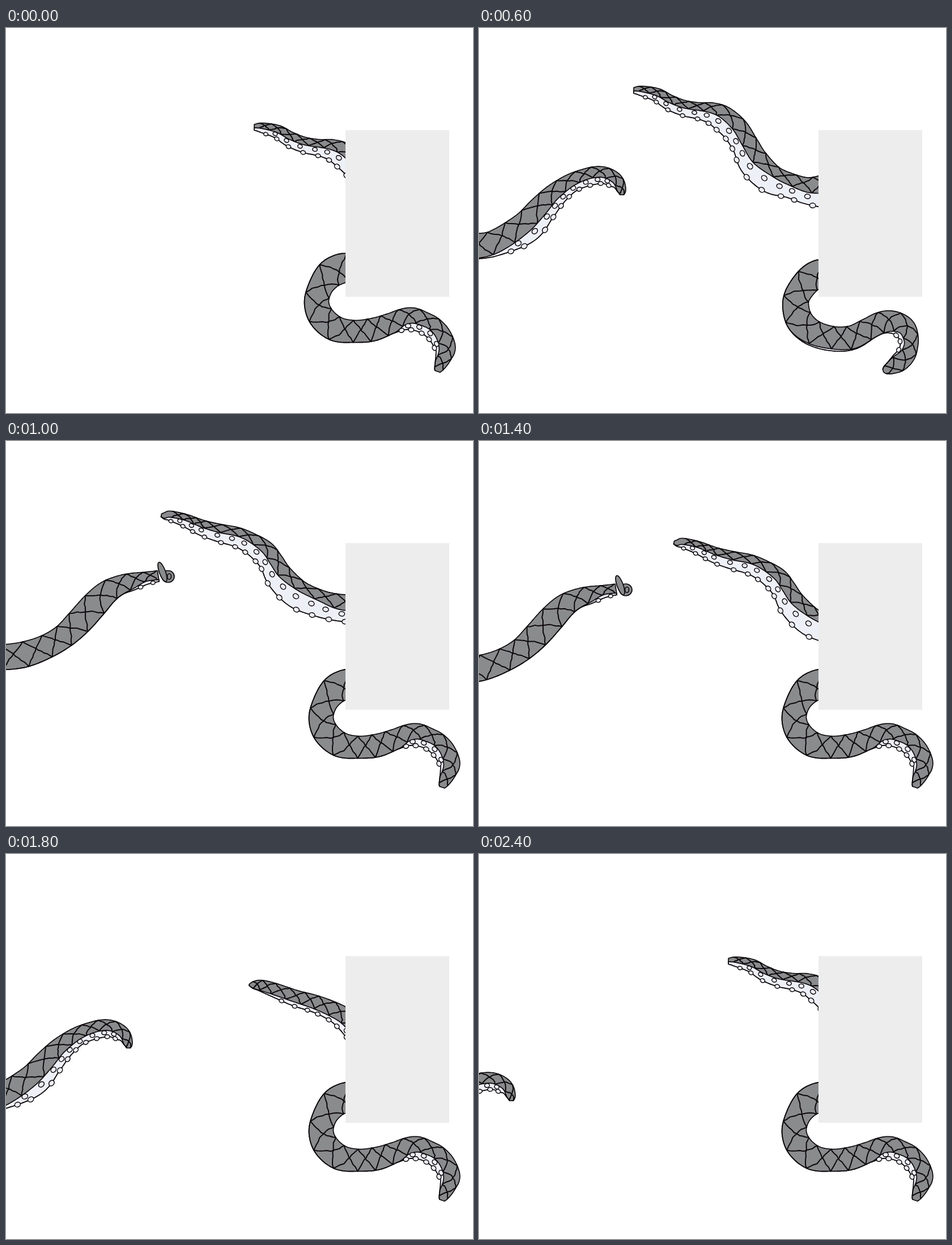
Write an HTML page that moves like this. It is 824x679 px and loops after 2600 ms.

```html
<!DOCTYPE html>
<html lang="en">
<head>
<meta charset="utf-8">
<title>Tentacles</title>
<style>
html, body { margin: 0; width: 100%; height: 100%; overflow: hidden; background: #fff; }
svg { display: block; width: 100%; height: 100%; }
path, ellipse { stroke: #0c070a; stroke-width: 1.7; stroke-linejoin: round; stroke-linecap: round; }
.skin { fill: #898b8d; }
.belly { fill: #eef0f8; }
.line { fill: none; stroke-width: 2; }
.sucker { fill: #eceef5; stroke-width: 1.5; }
</style>
</head>
<body>
<svg id="stage" viewBox="0 0 824 679" preserveAspectRatio="none">
  <g id="arms"></g>
  <rect x="599" y="180" width="183" height="294" fill="#ededed"/>
</svg>
<script>
// spine: key points [x, y, width, belly share of the width];
// pitch and phase set the spacing and start of the crossed skin lines.
const poses = {
  leftOpen: { pitch: 1, phase: -9, spine: [
    [-10, 385, 45, 0], [26, 380, 45, .1], [81, 353, 55, .33], [110, 321, 49, .3], [133, 296, 41, .31],
    [160, 275, 33, .3], [184, 265, 31, .36], [205, 260, 31, .38], [222, 260, 29, .35], [238, 267, 27, .3],
    [247, 275, 21, .15], [252, 288, 14, 0], [252, 296, 4, 0]] },
  leftCurl: { pitch: 1.05, phase: 3, curl: [286, 239], spine: [
    [-10, 382, 44, 0], [30, 377, 45, 0], [68, 364, 42, 0], [101, 345, 42, 0], [128, 320, 46, 0], [155, 290, 46, 0],
    [177, 268, 41, 0], [199, 255, 34, 0], [223, 248, 30, .1], [247, 242, 22, .25], [270, 238, 19, .15]] },
  highFlat: { pitch: 1, phase: 10, spine: [
    [273, 110, 10, .4], [287, 111, 17, .42], [314, 118, 23, .43], [336, 131, 26, .47], [361, 141, 27, .5],
    [388, 146, 29, .52], [410, 150, 37, .5], [429, 159, 44, .48], [452, 179, 46, .43], [470, 207, 46, .4],
    [486, 238, 53, .48], [515, 266, 50, .6], [549, 278, 43, .5], [580, 287, 47, .44], [612, 288, 60, .44]] },
  highRound: { pitch: 1, phase: 22, spine: [
    [274, 131, 5, 0], [280, 132, 12, .15], [290, 132, 17, .35], [316, 140, 22, .5], [346, 153, 27, .52],
    [376, 162, 31, .52], [406, 169, 34, .55], [429, 179, 36, .53], [454, 196, 42, .47], [469, 215, 42, .43],
    [484, 241, 48, .5], [514, 270, 50, .62], [552, 286, 47, .58], [582, 293, 47, .45], [612, 296, 48, .4]] },
  highTurned: { pitch: 1.1, phase: 8, spine: [
    [379, 216, 2, 0], [386, 216, 12, 0], [399, 217, 19, .05], [421, 224, 24, .15], [460, 239, 28, .25],
    [495, 249, 30, .2], [524, 261, 33, .2], [545, 274, 37, .25], [565, 296, 38, .3], [584, 318, 42, .3], [615, 355, 50, .35]] },
  lowWide: { pitch: .92, phase: 0, spine: [
    [612, 427, 50, 0], [597, 430, 52, 0], [579, 440, 50, 0], [563, 462, 43, 0], [556, 489, 43, 0], [565, 515, 45, 0],
    [589, 535, 44, 0], [621, 540, 39, 0], [655, 537, 40, 0], [687, 526, 36, 0], [708, 519, 37, .2], [726, 518, 39, .3],
    [744, 524, 37, .33], [760, 533, 38, .35], [774, 548, 38, .3], [783, 569, 36, .2], [780, 585, 28, .13],
    [775, 598, 21, 0], [770, 609, 12, 0], [769, 613, 3, 0]] },
  lowCurved: { pitch: .92, phase: 0, spine: [
    [612, 423, 53, 0], [597, 425, 51, 0], [580, 437, 49, 0], [562, 462, 46, 0], [560, 485, 46, 0], [567, 509, 47, .04],
    [585, 524, 46, .11], [616, 532, 40, .16], [646, 529, 38, .13], [676, 517, 35, .02], [700, 509, 35, 0],
    [716, 507, 38, .06], [734, 511, 38, .15], [748, 521, 38, .16], [757, 534, 36, .18], [761, 548, 34, .16],
    [757, 564, 30, .1], [747, 573, 23, .03], [738, 578, 16, 0], [729, 581, 7, 0]] },
  lowHooked: { pitch: .92, phase: 0, spine: [
    [612, 433, 50, 0], [597, 435, 50, 0], [580, 446, 47, 0], [562, 471, 45, 0], [559, 493, 46, 0], [567, 518, 47, 0],
    [590, 538, 45, .05], [625, 548, 43, .08], [658, 546, 42, .03], [688, 530, 38, 0], [706, 521, 38, 0],
    [723, 518, 39, .05], [740, 522, 39, .13], [752, 531, 38, .2], [758, 545, 34, .22], [759, 559, 31, .22],
    [754, 576, 32, .15], [741, 590, 32, .06], [727, 599, 23, 0], [717, 603, 14, 0], [713, 604, 5, 0]] }
};

// Keys [step, pose, dx, dy]: linear between keys of one pose, held otherwise.
const tracks = [
  [[1, 'leftOpen', -220, 84], [3, 'leftOpen', 0, 0], [4, 'leftCurl', 0, -5], [5, 'leftCurl', 0, 0],
   [6, 'leftCurl', -5, 1], [8, 'leftCurl', -49, 46], [9, 'leftOpen', -36, 48], [10, 'leftOpen', -62, 50],
   [11, 'leftOpen', -138, 106], [12, 'leftOpen', -195, 141]],
  [[0, 'highFlat', 165, 65], [2, 'highFlat', 76, 26], [3, 'highFlat', 0, 0], [4, 'highRound', 0, -9],
   [5, 'highRound', 0, 0], [7, 'highRound', 70, 48], [8, 'highTurned', 0, 0], [9, 'highTurned', 50, 15],
   [10, 'highFlat', 167, 79]],
  [[0, 'lowWide', -8, -5], [1, 'lowWide', 0, 0], [2, 'lowCurved', 0, 0], [3, 'lowHooked', 0, 0],
   [4, 'lowCurved', 0, 13], [5, 'lowWide', 0, 0], [8, 'lowCurved', 0, 13], [9, 'lowWide', 0, 0],
   [10, 'lowCurved', 0, 13], [11, 'lowWide', 0, 0]]
];
const STEP = 200, LOOP = 2600;

const mix = (a, b, t) => a + (b - a) * t;
const polyline = pts => 'M' + pts.map(p => p.map(v => v.toFixed(1))).join('L');

function catmull(a, b, c, d, t) {
  return b + t * (c - a + t * (2 * a - 5 * b + 4 * c - d + t * (3 * (b - c) + d - a))) / 2;
}

// Samples the spine evenly: an array of points 2 units apart.
function sampleSpine(keys) {
  const fine = [];
  for (let i = 0; i < keys.length - 1; i++) {
    const quad = [keys[i - 1] || keys[i], keys[i], keys[i + 1], keys[i + 2] || keys[i + 1]];
    for (let t = 0; t < 1; t += 1 / 32) {
      fine.push(keys[i].map((_, k) => catmull(...quad.map(q => q[k]), t)));
    }
  }
  fine.push(keys[keys.length - 1]);
  const even = [fine[0]];
  for (const p of fine) {
    const last = even[even.length - 1];
    if (Math.hypot(p[0] - last[0], p[1] - last[1]) >= 2) even.push(p);
  }
  return even;
}

// Describes a body: at(s) gives the section, edge(s, k) a point from back (0) to rim (1).
function makeBody(keys) {
  const pts = sampleSpine(keys), end = pts.length - 1;
  const length = pts.slice(1).reduce((sum, p, i) => sum + Math.hypot(p[0] - pts[i][0], p[1] - pts[i][1]), 0);
  const at = s => {
    const i = Math.round(Math.min(1, Math.max(0, s / length)) * end);
    const [x, y, w, share] = pts[i];
    const a = pts[Math.max(0, i - 2)], b = pts[Math.min(end, i + 2)];
    return { x, y, w, belly: Math.max(0, share), angle: Math.atan2(b[1] - a[1], b[0] - a[0]) };
  };
  const edge = (s, k) => {
    const p = at(s), off = p.w * (.5 - k);
    return [p.x + Math.sin(p.angle) * off, p.y - Math.cos(p.angle) * off];
  };
  const seam = s => 1 - at(s).belly;
  const side = k => {
    const out = [];
    for (let s = 0; s <= length; s += 2) out.push(edge(s, k(s)));
    return out;
  };
  return { at, edge, seam, side, length };
}

function add(parent, tag, attrs) {
  const el = document.createElementNS('http://www.w3.org/2000/svg', tag);
  for (const k in attrs) el.setAttribute(k, attrs[k]);
  return parent.appendChild(el);
}

function addEllipse(g, cls, [x, y], rx, ry, turn = 0) {
  add(g, 'ellipse', { class: cls, rx, ry, transform: `translate(${x} ${y}) rotate(${turn})` });
}

// A slightly arched line across the back, from one section to another.
function crossLine(body, from, to) {
  const pts = [];
  for (let i = 0; i <= 10; i++) {
    const t = i / 10, s = mix(from, to, t * (1.35 - .35 * t));
    pts.push(body.edge(s, t * body.seam(s)));
  }
  return polyline(pts);
}

function addSkinLines(g, body, pitch, phase) {
  let d = '';
  for (let s = phase, next; s < body.length - 12; s = next) {
    next = s + pitch * (8 + .65 * body.at(s).w);
    d += crossLine(body, s, next) + crossLine(body, next, s);
  }
  add(g, 'path', { class: 'line', d });
}

function addSuckers(g, body) {
  for (let s = 15; s < body.length - 12; s += 20 + .15 * body.at(s).w) {
    const put = (pos, k, minBelly) => {
      const p = body.at(pos), r = 3 + .045 * p.w;
      if (p.w * p.belly < minBelly) return;
      addEllipse(g, 'sucker', body.edge(pos, k(p)), r, r * .8, p.angle * 180 / Math.PI);
    };
    put(s, p => 1 - p.belly * .66, 9);
    put(s + 8, () => 1, 3.5);
  }
}

function addCurl(g, [x, y]) {
  addEllipse(g, 'skin', [x, y], 11, 10.5);
  addEllipse(g, 'skin', [x + 2, y], 3.5, 5);
  addEllipse(g, 'skin', [x - 10, y - 8], 5.5, 18, -20);
}

function build(parent, { spine, pitch, phase, curl }) {
  const g = add(parent, 'g', { display: 'none' });
  const body = makeBody(spine);
  const back = body.side(() => 0), rim = body.side(() => 1).reverse(), seam = body.side(body.seam);
  add(g, 'path', { class: 'skin', d: polyline([...back, ...rim]) + 'Z' });
  addSkinLines(g, body, pitch, phase);
  add(g, 'path', { class: 'belly', d: polyline([...seam, ...rim]) + 'Z' });
  addSuckers(g, body);
  if (curl) addCurl(g, curl);
  return g;
}

const arms = document.getElementById('arms');
const groups = {};
for (const name in poses) groups[name] = build(arms, poses[name]);

function place(track, step) {
  const i = track.findLastIndex(key => key[0] <= step);
  if (i < 0) return;
  const [from, name, x, y] = track[i];
  const next = track[i + 1];
  const [to, , nx, ny] = next && next[1] === name ? next : [from + 1, name, x, y];
  const t = (step - from) / (to - from);
  groups[name].setAttribute('transform', `translate(${mix(x, nx, t)} ${mix(y, ny, t)})`);
  groups[name].setAttribute('display', 'inline');
}

function draw(ms) {
  const step = Math.floor((ms % LOOP) / STEP);
  for (const name in groups) groups[name].setAttribute('display', 'none');
  for (const track of tracks) place(track, step);
}

let start;
function tick(now) {
  start ??= now;
  draw(now - start);
  requestAnimationFrame(tick);
}
draw(0);
requestAnimationFrame(tick);
</script>
</body>
</html>
```
